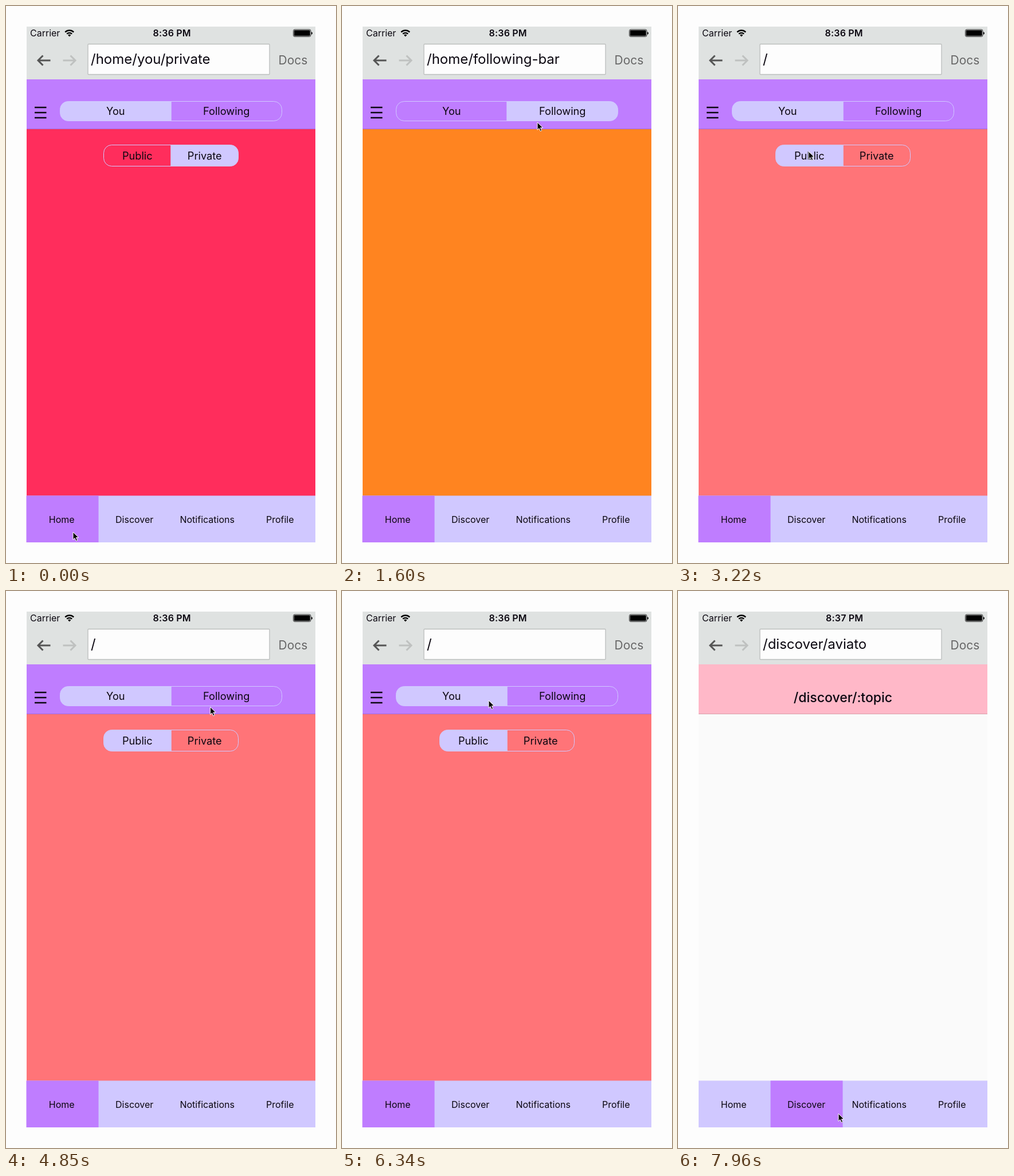
These frames come from a looping animation (576 px wide and 972 px high, 8 s). An HTML page:

```html
<!DOCTYPE html>
<html lang="en">
<head>
<meta charset="utf-8">
<title>Nested tabs</title>
<style>
  html, body { margin: 0; width: 100%; height: 100%; overflow: hidden; background: #fdfdfd; }
  svg { display: block; }
  text { font-family: Inter, "Liberation Sans", sans-serif; fill: #0b0710; }
  .mid { text-anchor: middle; }
  .small { font-size: 16px; }
  .label { font-size: 18.2px; }
  .url { font-size: 24px; }
  .line { fill: none; stroke-width: 3; }
</style>
</head>
<body>
<svg width="576" height="972" viewBox="0 0 576 972">
  <rect width="576" height="972" fill="#fdfdfd"/>
  <rect id="page" x="36" y="215" width="504" height="640"/>

  <!-- status and address bars -->
  <rect x="36" y="36" width="504" height="92" fill="#dfe2e1"/>
  <text class="small" x="42" y="53">Carrier</text>
  <g class="line" stroke="#000" style="stroke-width:2.3">
    <path d="M103.2 45.6a10.6 10.6 0 0 1 15 0"/>
    <path d="M106.2 48.7a6.4 6.4 0 0 1 9 0"/>
  </g>
  <path d="M110.7 53.4l-2.6-2.7a3.7 3.7 0 0 1 5.2 0z"/>
  <text id="clock" class="small mid" y="53" font-weight="600" letter-spacing=".2"></text>
  <rect x="501.5" y="41" width="30.5" height="12.5" rx="2.5" fill="none" stroke="#000" stroke-width=".8"/>
  <rect x="502.7" y="42.2" width="28" height="10" rx="1.3"/>
  <path d="M533 45a2.6 2.6 0 0 1 0 5z"/>
  <path class="line" d="M77.5 95H56M64.5 86.5L56 95l8.5 8.5" stroke="#555"/>
  <path class="line" d="M99.5 95H121M112.5 86.5L121 95l-8.5 8.5" stroke="#bfc1c0"/>
  <rect x="143" y="66.5" width="317" height="53" rx="1" fill="#fdfdfd" stroke="#bcbebd" stroke-width="1.3"/>
  <text id="url" class="url" x="148" y="101"></text>
  <text class="mid" x="501" y="101.5" font-size="21" style="fill:#666">Docs</text>

  <!-- header -->
  <rect id="head" x="36" y="128" width="504" height="87"/>
  <rect x="36" y="214" width="504" height="1" opacity=".15"/>
  <g id="home">
    <path d="M50 177h20.500M50 186h20.500M50 195h20.500" stroke="#0b0710" stroke-width="2.4"/>
    <g id="top"></g>
  </g>
  <g id="sub"></g>
  <text id="title" class="mid" x="288" y="194" font-size="23" font-weight="500">/discover/:topic</text>

  <!-- tab bar -->
  <rect x="36" y="854.5" width="504" height="81.5" fill="#d0c8ff"/>
  <rect id="tab" y="854.5" width="126" height="81.5" fill="#bf7dff"/>
  <g id="tabs"></g>

  <path id="cursor" d="M0 0v13.300l3-2.800 2.300 5 2.300-1.100-2.200-4.800h4.300z" stroke="#fff"/>
</svg>
<script>
const $ = id => document.getElementById(id);
const LOOP = 8000, STEP = 145, LIGHT = '#d0c8ff', PURPLE = '#bf7dff';

// A two-part segmented control, split at x = 288
function pill(id, half, y, h, names) {
  const r = 14, w = half - r, ih = h - 2 * r;
  const side = s => {
    const arc = `a${r} ${r} 0 0 ${s > 0 ? 1 : 0}`;
    return `M288 ${y}h${s * w}${arc} ${s * r} ${r}v${ih}${arc} ${-s * r} ${r}h${-s * w}z`;
  };
  $(id).innerHTML = [-1, 1].map((s, i) =>
    `<path d="${side(s)}" stroke="${LIGHT}"/>` +
    `<text class="label mid" x="${288 + s * half / 2}" y="${y + h / 2 + 6.7}">${names[i]}</text>`).join('');
  const parts = $(id).querySelectorAll('path');
  return on => parts.forEach((p, i) => p.setAttribute('fill', i === on ? LIGHT : 'none'));
}
const setTop = pill('top', 193.5, 166.5, 34, ['You', 'Following']);
const setSub = pill('sub', 117.5, 242.5, 37, ['Public', 'Private']);

$('tabs').innerHTML = ['Home', 'Discover', 'Notifications', 'Profile'].map((name, i) =>
  `<text class="small mid" x="${97.2 + i * 127}" y="901.8">${name}</text>`).join('');

const views = {
  private:   { url: '/home/you/private', color: '#ff2d5c', top: 0, sub: 1 },
  public:    { url: '/', color: '#ff7478', top: 0, sub: 0 },
  following: { url: '/home/following-bar', color: '#ff8420', top: 1 },
  discover:  { url: '/discover/aviato', color: '#fafafa', tab: 1 }
};

// Each trip moves the pointer along a curve, then clicks to open a view
const trips = [
  { start: 750, steps: 5, to: [341, 203], bend: [385, 120], click: 1600, view: 'following' },
  { start: 1900, steps: 3, to: [242, 190], click: 2480, view: 'private' },
  { start: 2630, steps: 3, to: [228, 254], click: 3220, view: 'public' },
  { start: 3970, steps: 8, to: [347, 195], bend: [465, 283], click: 5600, view: 'following' },
  { start: 5750, steps: 3, to: [256, 191], click: 6340, view: 'public' },
  { start: 6490, steps: 5, to: [214, 912], bend: [265, 560], click: 7670, view: 'discover' },
  { start: 7810, steps: 2, to: [280, 912] }
];
const HOME = [117, 918];

function pointer(t) {
  const i = trips.findLastIndex(p => p.start <= t);
  if (i < 0) return HOME;
  const { start, steps, to, bend } = trips[i];
  const from = i ? trips[i - 1].to : HOME;
  const k = Math.min(1, (Math.floor((t - start) / STEP) + 1) / steps);
  const u = k * k * (3 - 2 * k), v = 1 - u;
  return to.map((end, a) => {
    const mid = bend ? bend[a] : (from[a] + end) / 2;
    return v * v * from[a] + 2 * u * v * mid + u * u * end;
  });
}

const show = (id, on) => $(id).setAttribute('visibility', on ? 'visible' : 'hidden');
let current;

function setView(name) {
  if (name === current) return;
  current = name;
  const v = views[name], home = !v.tab;
  $('url').textContent = v.url;
  $('page').setAttribute('fill', v.color);
  $('head').setAttribute('fill', home ? PURPLE : '#ffb8c8');
  $('tab').setAttribute('x', home ? 35.5 : 161.5);
  show('home', home);
  show('sub', 'sub' in v);
  show('title', !home);
  setTop(v.top);
  setSub(v.sub);
}

function draw() {
  const t = performance.now() % LOOP;
  setView(trips.findLast(p => p.click <= t)?.view ?? 'private');
  const late = t >= 6630;
  $('clock').textContent = late ? '8:37 PM' : '8:36 PM';
  $('clock').setAttribute('x', late ? 290.7 : 289.7);
  $('cursor').setAttribute('transform', `translate(${pointer(t)})`);
  requestAnimationFrame(draw);
}
draw();
</script>
</body>
</html>
```
